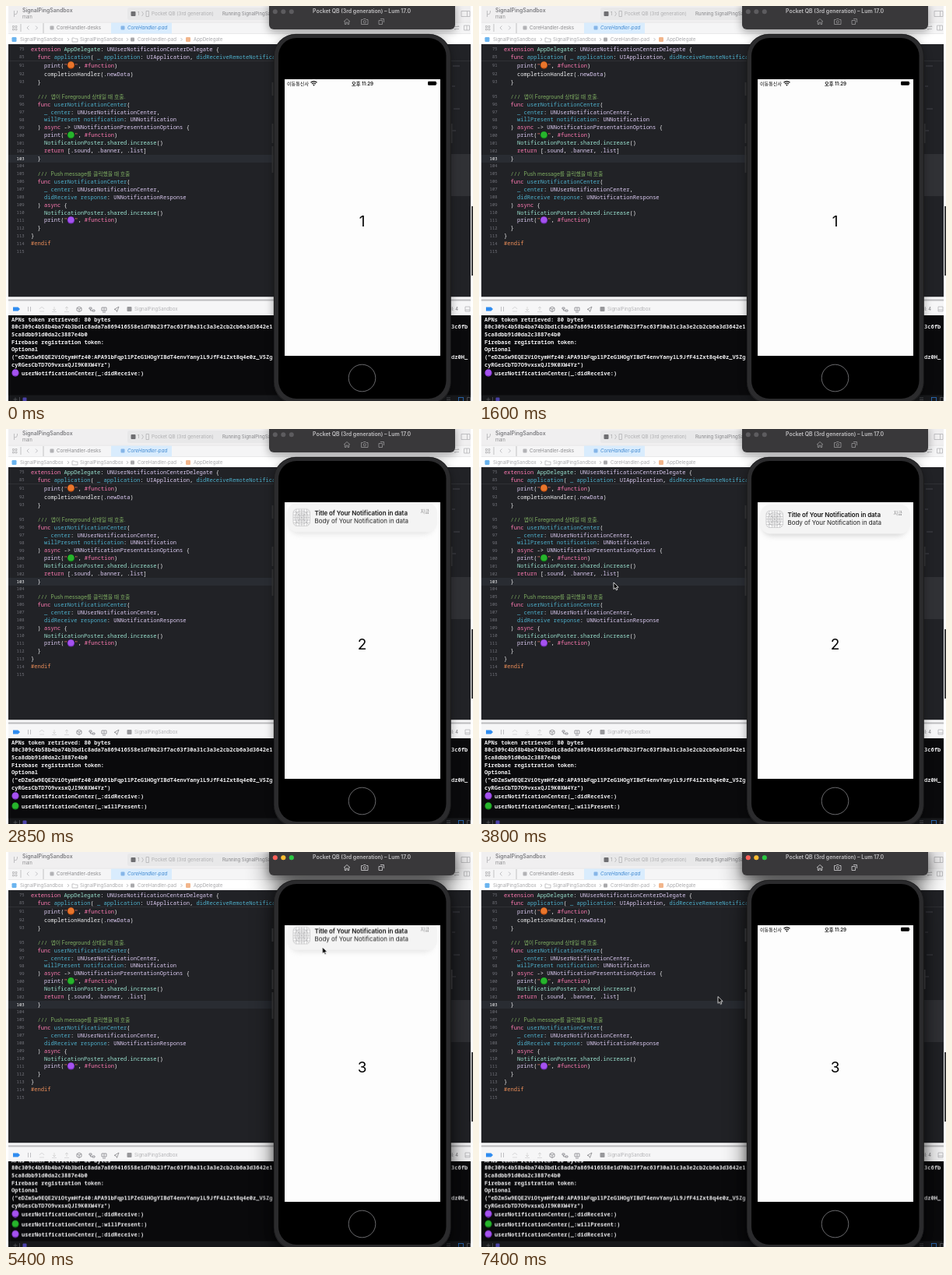
These frames come from a looping animation (600 by 507 pixels, 7.45 s). An HTML page:

```html
<!DOCTYPE html>
<html lang="ko">
<head>
<meta charset="utf-8">
<title>Push notification demo</title>
<style>
html, body { margin: 0; width: 100%; height: 100%; overflow: hidden; background: #fff; }
svg { display: block; width: 600px; height: 507px; }
text { font-family: Inter, "Noto Sans CJK KR", "Noto Sans CJK", sans-serif; white-space: pre; }
.mono { font: 600 7.08px "Noto Sans Mono", "Noto Sans CJK KR", monospace; }
#code .mono { font-weight: 500; }
.doc { font-size: 6.9px; letter-spacing: -.1px; }
.num { font: 5.6px "Noto Sans Mono", monospace; fill: #73747c; text-anchor: end; }
.current { fill: #fff; }
.line { fill: none; stroke: #b4b4b6; stroke-width: .8; }
.mid { text-anchor: middle; }

/* one shared 7450 ms timeline */
.anim { animation: 7450ms linear infinite; }
.step { animation-timing-function: step-end; }
#one { animation-name: one; }
#two { animation-name: two; }
#three, #log3 { animation-name: last; }
#log2 { animation-name: second; }
#log { animation-name: scroll; }
#focus, #glow { animation-name: focus; }
#tools { animation-name: tools; }
#status { animation-name: status; }
#banner { animation-name: banner; }
#shade { animation-name: shade; }
#cursor { animation-name: move; }
#arrow { animation-name: show; }
@keyframes one { 0% { opacity: 1 } 30.87%, 100% { opacity: 0 } }
@keyframes two { 0% { opacity: 0 } 30.87% { opacity: 1 } 71.14%, 100% { opacity: 0 } }
@keyframes second { 0% { opacity: 0 } 30.87%, 100% { opacity: 1 } }
@keyframes last { 0% { opacity: 0 } 71.14%, 100% { opacity: 1 } }
@keyframes scroll { 0% { transform: translateY(0) } 71.14%, 100% { transform: translateY(-6.5px) } }
@keyframes focus { 0% { opacity: 0 } 69.8%, 100% { opacity: 1 } }
@keyframes tools { 0% { stroke: #98989a } 69.8%, 100% { stroke: #d6d6d8 } }
@keyframes status { 0%, 32.2% { opacity: 1 } 33.6%, 73.2% { opacity: 0 } 75.2%, 100% { opacity: 1 } }
@keyframes banner {
  0%, 32.21% { transform: translateY(-48px); animation-timing-function: cubic-bezier(.33, 1, .68, 1) }
  41.61%, 70.47% { transform: none; animation-timing-function: cubic-bezier(.4, 0, .8, .6) }
  75.5%, 100% { transform: translateY(-48px) }
}
@keyframes shade { 0%, 32.21% { opacity: 0 } 41.61%, 70.47% { opacity: .6 } 75.5%, 100% { opacity: 0 } }
@keyframes move {
  0%, 51.3% { transform: translate(173px, 197px); animation-timing-function: ease-in-out }
  59.7%, 92% { transform: translate(406.5px, 122px); animation-timing-function: ease-in-out }
  99%, 100% { transform: translate(307px, 185.5px) }
}
@keyframes show { 0% { opacity: 0 } 48.3%, 100% { opacity: 1 } }
</style>
</head>
<body>
<svg viewBox="0 0 600 507">
  <defs>
    <clipPath id="console"><rect x="3" y="397" width="594" height="102"/></clipPath>
    <clipPath id="screen"><rect x="358" y="94" width="200" height="355"/></clipPath>
    <filter id="blur" x="-20%" y="-40%" width="140%" height="200%"><feGaussianBlur stdDeviation="3.5"/></filter>
    <filter id="near" x="-30%" y="-20%" width="160%" height="140%"><feGaussianBlur stdDeviation="6"/></filter>
    <filter id="far" x="-40%" y="-30%" width="180%" height="160%"><feGaussianBlur stdDeviation="15"/></filter>
    <g id="outline">
      <rect x="338" y="-6" width="239" height="36" rx="6"/>
      <rect x="344" y="36" width="227.5" height="475" rx="28"/>
    </g>
  </defs>
  <rect width="600" height="507" fill="#fff"/>

  <!-- toolbar -->
  <rect x="3" width="594" height="21" fill="#f0eff0"/>
  <path class="line" d="M10.5 6v8M14.5 6v2q0 3-4 3"/>
  <text x="21" y="8" font-size="6.9" font-weight="600" fill="#7d7d80">SignalPingSandbox</text>
  <text x="21" y="16" font-size="5.6" fill="#8e8e90">main</text>
  <rect x="156" y="2" width="190" height="16" rx="3" fill="#e8e8e9"/>
  <rect x="160.5" y="7" width="6" height="6" rx="1" fill="#6f6f72"/>
  <text x="169" y="12.2" font-size="5.6" fill="#9b9b9d">1</text>
  <path class="line" d="M174.500 7l2 3-2 3M180 6.500h3.500v7H180z"/>
  <text x="187" y="12.2" font-size="6.2" fill="#aeaeb0">Pocket QB (3rd generation)</text>
  <text x="278" y="12.2" font-size="6" fill="#858588">Running SignalPingSandbox</text>
  <path class="line" d="M585 6.500h11v7h-11zM592.500 6.500v7"/>

  <!-- tabs -->
  <rect x="3" y="21" width="594" height="14.5" fill="#f5f5f6"/>
  <path d="M3 21.200h594M3 35.500h594" stroke="#dededf" stroke-width=".6"/>
  <path class="line" d="M8.500 25.500h2v2h-2zM12 25.500h2v2h-2zM8.500 29h2v2h-2zM12 29h2v2h-2zM19 23v10M29.500 25.500l-2.500 2.500 2.500 2.500M38 25.500l2.500 2.500-2.500 2.500M48 22v13"/>
  <rect x="135" y="21.5" width="78" height="14" fill="#d9ecfd"/>
  <rect x="56.5" y="25.5" width="5" height="5" rx="1" fill="#b2b2b5"/>
  <text x="65" y="30.2" font-size="6.2" fill="#8b8b8e">CoreHandler-desks</text>
  <rect x="147.5" y="25.5" width="5" height="5" rx="1" fill="#85b5e8"/>
  <text x="156" y="30.2" font-size="6.2" font-style="italic" fill="#3e87d0">CoreHandler-pad</text>
  <path class="line" d="M576 26.500h6l-1.500-1.500M582 29.500h-6l1.500 1.500M588.500 25h7v6h-7zM592 25v6"/>

  <!-- path bar -->
  <rect x="3" y="36" width="594" height="13" fill="#fff"/>
  <rect x="7.5" y="40" width="6" height="6" rx="1.2" fill="#6bb4ef"/>
  <g font-size="6.1" fill="#a7a7aa">
    <text x="18" y="45.2">SignalPingSandbox</text>
    <text x="95" y="45.2">SignalPingSandbox</text>
    <text x="169" y="45.2">CoreHandler-pad</text>
    <text x="241" y="45.2">AppDelegate</text>
  </g>
  <path class="line" d="M79 41l2 2-2 2M155 41l2 2-2 2M224.500 41l2 2-2 2M85 41h2.500l1 1h3.500v4h-7z"/>
  <rect x="160" y="40.5" width="5" height="5" rx="1" fill="#a9a9ac"/>
  <rect x="231" y="40" width="6" height="6" rx="1.3" fill="#f2b58b"/>

  <!-- editor -->
  <rect x="3" y="49" width="594" height="324.5" fill="#212226"/>
  <rect x="3" y="191" width="594" height="10" fill="#292c32"/>
  <path d="M3 70.500h594" stroke="#36373c" stroke-width=".7"/>
  <rect x="571" y="190" width="26" height="54" fill="#303135"/>
  <path d="M574 77h9M573 103h4M575 132h8M573 160h5" stroke="#4c4d54" stroke-width=".8"/>
  <g id="code"></g>
  <rect x="598" y="257" width="2" height="89" fill="#3a3a3c"/>

  <!-- debug bar -->
  <rect x="3" y="373.5" width="594" height="23.5" fill="#f6f6f7"/>
  <path d="M3 377.500h594" stroke="#bdbdbf" stroke-width="2"/>
  <path d="M9 386.500h6.500l2.500 2.500-2.500 2.500H9z" fill="#2f8cf0"/>
  <path class="line" stroke-width="1.1" d="M28.500 386v6M31.500 386v6"/>
  <path class="line" opacity=".55" d="M43 389q3-5 6 0M43 392h6M62 386v5M60 389l2 2 2-2M59 392.500h6M78 391v-5M76 388l2-2 2 2M75 392.500h6"/>
  <path class="line" style="stroke:#858588" d="M94 386l3 1.500v3.500l-3 1.500-3-1.500v-3.500zM91 387.500l3 1.500 3-1.500M94 389v3.500M107 387h3v2h-3zM111 390h3v2h-3zM108.500 389v2h2.500M123 387h6v4h-6zM126 387v4M124 393h4M139 389.500l6-3.500-2.500 6.500-1-2.500z"/>
  <rect x="155.5" y="386" width="6" height="6" rx="1" fill="#98989b"/>
  <text x="165" y="391.2" font-size="6.1" fill="#b3b3b6">SignalPingSandbox</text>
  <text x="581" y="391.2" font-size="5.8" fill="#77777a" text-anchor="end">Col: 4</text>
  <path class="line" d="M590 386h6v6h-6zM590 390h6"/>

  <!-- console -->
  <rect x="3" y="397" width="594" height="110" fill="#0a0a0c"/>
  <g clip-path="url(#console)">
    <g id="log" class="anim step">
      <g id="output"></g>
      <g id="log2" class="anim step"></g>
      <g id="log3" class="anim step"></g>
    </g>
  </g>
  <rect x="3" y="499.5" width="594" height="8" fill="#17181b"/>
  <path class="line" style="stroke:#55565c" d="M9.500 505h5M12 502.500v5M17.500 502v5M566 503h5M566 505.500h5M592.500 502.500h4v5h-4z"/>
  <rect x="21.5" y="502.5" width="5" height="5" rx="1" fill="#4b42a8"/>
  <rect x="581.5" y="502.5" width="6" height="5" fill="none" stroke="#2b71c4" stroke-width=".8"/>

  <!-- simulator, with a wider shadow while focused -->
  <use href="#outline" y="3" opacity=".35" filter="url(#near)"/>
  <g id="glow" class="anim step"><use href="#outline" y="10" opacity=".6" filter="url(#far)"/></g>
  <path d="M342.500 98v17M342.500 151v25M342.500 180v34M572.500 151v25" stroke="#2e2e30" stroke-width="2"/>
  <rect x="344" y="36" width="227.5" height="475" rx="28" fill="#2b2b2d"/>
  <rect x="350" y="41" width="215.5" height="463" rx="23" fill="#000"/>
  <rect x="344.3" y="36.3" width="227" height="474" rx="28" fill="none" stroke="#161617" stroke-width=".7"/>
  <circle cx="457.5" cy="477.5" r="17.3" fill="#000" stroke="#77777a" stroke-width=".9"/>
  <rect x="358" y="94" width="200" height="355" fill="#fdfdfd"/>

  <rect x="338" y="-6" width="239" height="36" rx="6" fill="#39383a"/>
  <g fill="#5d5c5f"><circle cx="345.8" cy="7.3" r="3"/><circle cx="356.3" cy="7.3" r="3"/><circle cx="366.8" cy="7.3" r="3"/></g>
  <g id="focus" class="anim step">
    <circle cx="345.8" cy="7.3" r="3" fill="#fe5f57"/>
    <circle cx="356.3" cy="7.3" r="3" fill="#febc2e"/>
    <circle cx="366.8" cy="7.3" r="3" fill="#28c840"/>
  </g>
  <text class="mid" x="457" y="9.4" font-size="6.9" font-weight="600" fill="#c3c2c4">Pocket QB (3rd generation) – Lum 17.0</text>
  <g id="tools" class="anim step" fill="none" stroke-width=".8">
    <path d="M434 20l4-3.500 4 3.500M435.300 19.500v4h1.700v-2.500h2v2.500h1.700v-4M458 17.500h-1.500v6h8.500v-6h-2l-1-1h-2.500l-1 1zM479 18.500h4.500v5H479zM481 16.500h4.500v4.500"/>
    <circle cx="460.8" cy="20.3" r="1.6"/>
  </g>

  <g clip-path="url(#screen)">
    <g id="status" class="anim">
      <text x="361" y="101.5" font-size="6.1" fill="#111">이동통신사</text>
      <path d="M391.500 98.300q4-3.500 8 0M393 100q2.500-2 5 0" fill="none" stroke="#111" stroke-width="1.2"/>
      <circle cx="395.5" cy="101.5" r=".9" fill="#111"/>
      <text class="mid" x="458" y="101.5" font-size="6.2" font-weight="600" fill="#111">오후 11:29</text>
      <rect x="542" y="96.7" width="10.8" height="5" rx="1.3" fill="#000"/>
      <rect x="553.3" y="98.3" width=".8" height="1.8" fill="#777"/>
    </g>
    <g class="mid" font-size="19" fill="#050505">
      <text id="one" class="anim step" x="457.5" y="283">1</text>
      <text id="two" class="anim step" x="457.5" y="283">2</text>
      <text id="three" class="anim step" x="457.5" y="283">3</text>
    </g>
    <g id="banner" class="anim">
      <rect id="shade" class="anim" x="364" y="103" width="186" height="34" rx="13" fill="#bbb" filter="url(#blur)"/>
      <rect x="361.5" y="97" width="192.5" height="37.5" rx="12.5" fill="#f4f4f4"/>
      <rect x="369" y="105" width="21.5" height="21.5" rx="4.8" fill="#fdfdfd"/>
      <g fill="none" stroke="#a6a6a8" stroke-width=".5">
        <rect x="369" y="105" width="21.5" height="21.5" rx="4.8"/>
        <path d="M373 105v21.500M376.400 105v21.500M379.750 105v21.500M383.100 105v21.500M386.500 105v21.500M369 109h21.500M369 112.400h21.500M369 115.750h21.500M369 119.100h21.500M369 122.500h21.500M370.500 106.500l18.500 18.500M389 106.500l-18.500 18.500"/>
        <circle cx="379.75" cy="115.75" r="8.7"/><circle cx="379.75" cy="115.75" r="5.4"/><circle cx="379.75" cy="115.75" r="3.2"/>
      </g>
      <text x="396.5" y="113.3" font-size="8" font-weight="600" letter-spacing="-.08" fill="#151515">Title of Your Notification in data</text>
      <text x="396.5" y="122.8" font-size="8" letter-spacing="-.06" fill="#222">Body of Your Notification in data</text>
      <text x="532.5" y="109.7" font-size="6.2" fill="#858587">지금</text>
    </g>
  </g>

  <g id="cursor" class="anim">
    <path id="arrow" class="anim step" d="M0 0v8.600l2-1.800 1.400 3 1.500-.7-1.400-2.900h2.700z" fill="#000" stroke="#fff" stroke-width=".8"/>
  </g>
</svg>
<script>
const NS = 'http://www.w3.org/2000/svg';
const CHAR = 7.08 * 0.6, EMOJI = 9.4;
const ink = {
  k: '#ff7ab2', f: '#4eb0cc', t: '#dccbf2', m: '#9be3d0',
  w: '#f0f0f2', s: '#ff8170', o: '#f0905a', d: '#7fae62'
};
const dots = { o: ['#e9762c', '#b94d12'], g: ['#27b52c', '#12761a'], p: ['#a552ef', '#7430b8'] };
const $ = id => document.getElementById(id);

function add(parent, name, attrs, text) {
  const el = document.createElementNS(NS, name);
  for (const key in attrs) el.setAttribute(key, attrs[key]);
  if (text) el.textContent = text;
  parent.appendChild(el);
}

function dot(parent, x, y, key) {
  const [light, dark] = dots[key];
  add(parent, 'circle', { cx: x, cy: y, r: 4.7, fill: dark });
  add(parent, 'circle', { cx: x, cy: y - .6, r: 3.9, fill: light });
}

// Segments are split by "|"; the first letter picks the colour,
// "@" places a round emoji and "#" a proportional comment.
function write(parent, x, y, source) {
  for (const part of source.split('|')) {
    const key = part[0], body = part.slice(1);
    if (key === '@') {
      dot(parent, x + EMOJI / 2, y, body);
      x += EMOJI;
    } else if (key === '#') {
      add(parent, 'text', { class: 'doc', x, y: y + 2.5, fill: ink.d }, body);
    } else {
      add(parent, 'text', { class: 'mono', x, y: y + 2.5, fill: ink[key] }, body);
      x += body.length * CHAR;
    }
  }
}

const print = key => 'tprint|w(|s"|@' + key + '|s"|w, |k#function|w)';
const increase = 'mNotificationPoster|w.|mshared|w.|mincrease|w()';
const center = 'f_ center|w: |tUNUserNotificationCenter|w,';
const method = 'kfunc |fuserNotificationCenter|w(';

// line number: [indent, segments]
const code = {
  75: [0, 'kextension |mAppDelegate|w: |tUNUserNotificationCenterDelegate|w {'],
  85: [1, 'kfunc |fapplication|w( |f_ application|w: |tUIApplication|w, |fdidReceiveRemoteNotification'],
  91: [2, print('o')],
  92: [2, 'wcompletionHandler(.|tnewData|w)'],
  93: [1, 'w}'],
  95: [1, 'd/// |#앱이 Foreground 상태일 때 호출.'],
  96: [1, method],
  97: [2, center],
  98: [2, 'fwillPresent notification|w: |tUNNotification'],
  99: [1, 'w) |kasync|w -> |tUNNotificationPresentationOptions|w {'],
  100: [2, print('g')],
  101: [2, increase],
  102: [2, 'kreturn|w [.|tsound|w, .|tbanner|w, .|tlist|w]'],
  103: [1, 'w}'],
  104: [0, ''],
  105: [1, 'd/// |#Push message를 클릭했을 때 호출'],
  106: [1, method],
  107: [2, center],
  108: [2, 'fdidReceive response|w: |tUNNotificationResponse'],
  109: [1, 'w) |kasync|w {'],
  110: [2, increase],
  111: [2, print('p')],
  112: [1, 'w}'],
  113: [0, 'w}'],
  114: [0, 'o#endif'],
  115: [0, '']
};
// lines above the first gap sit under the sticky header
const upper = { 75: 55.3, 85: 65, 91: 76, 92: 87, 93: 97 };

for (const n in code) {
  const [indent, source] = code[n];
  const y = upper[n] || 116.2 + (n - 95) * 9.92;
  add($('code'), 'text', { class: n === '103' ? 'num current' : 'num', x: 23.7, y: y + 2 }, n);
  if (source) write($('code'), 32 + indent * 2 * CHAR, y, source);
}

const output = [
  'APNs token retrieved: 80 bytes',
  '80c309c4b58b4ba74b3bd1c8ada7a869416558e1' + 'd70b23f7ac63f30a31c3a3e2cb2cb6a3d3642e1',
  '5ca8dbb91d0da2c3887e4b0',
  'Firebase registration token:',
  'Optional',
  '("eDZmSw9EQE2ViOtymHfz40:APA91bFqp11PZeG1' + 'HOgYIBdT4envYanylL9JfF4iZxt8q4e0z_V5Zg',
  'cyRGesCbTD7O9vxsxQJI9K0XW4Yz")'
];
const row = i => 402.2 + i * 9.65;
output.forEach((line, i) => write($('output'), 7, row(i), 'w' + line));
write($('output'), 7 + 133 * CHAR, row(1), 'w3c6fb');
write($('output'), 7 + 133 * CHAR, row(5), 'wdz0H_');

const event = (id, y, key, label) =>
  write($(id), 7.2, y, `@${key}|wuserNotificationCenter(_:${label}:)`.replace('|w', '|w '));
const logEvent = (id, y, key, label) => {
  dot($(id), 12, y, key);
  write($(id), 20, y, `wuserNotificationCenter(_:${label}:)`);
};
logEvent('output', 471, 'p', 'didReceive');
logEvent('log2', 484, 'g', 'willPresent');
logEvent('log3', 497, 'p', 'didReceive');
</script>
</body>
</html>
```
